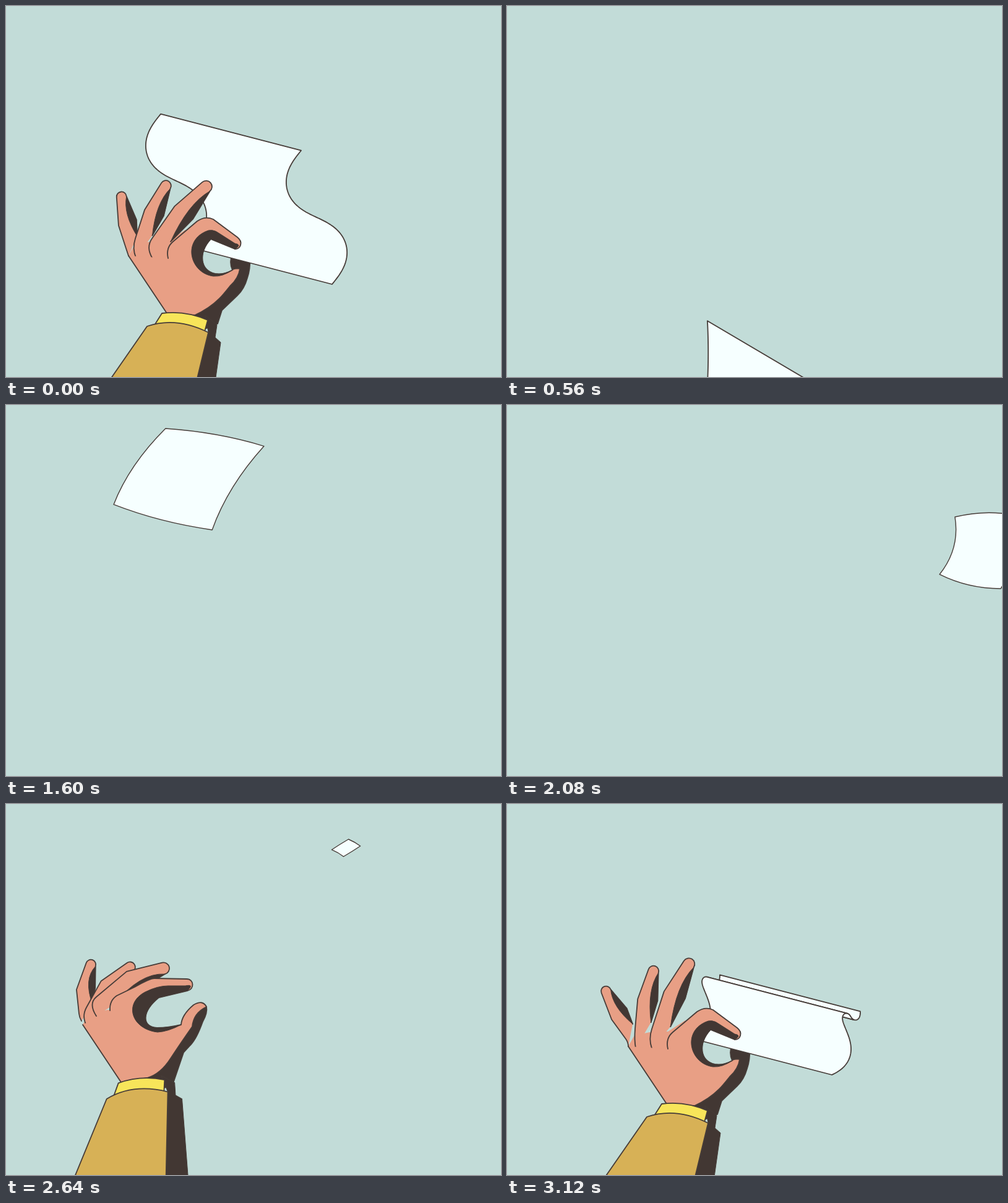
An HTML page with a canvas that plays this animation: 800 px wide and 600 px high, repeating every 3200 ms.

```html
<!DOCTYPE html>
<html lang="en">
<head>
<meta charset="utf-8">
<title>Paper throw</title>
<style>
html, body { margin: 0; width: 100%; height: 100%; overflow: hidden; background: #c2dcd8; }
canvas { display: block; width: 100vw; height: 100vh; }
</style>
</head>
<body>
<canvas id="stage" width="800" height="600"></canvas>
<script>
const LOOP = 3200, STEP = 80;
const INK = '#463c38', DARK = '#423733', SKIN = '#e89f85', PAPER = '#f6ffff';
const BG = '#c2dcd8', YELLOW = '#f7e55a', COAT = '#d7b156';
const ctx = document.getElementById('stage').getContext('2d');
const { sin, cos, abs, hypot, PI } = Math;
const rad = deg => deg * PI / 180;
const lerp = (a, b, k) => a + (b - a) * k;

// Each outline runs from the closed grip to the open hand
const GRIP = {
  hole: ['L331 377 C310 400 314 428 338 433 Q352 435 366 427',
         'L321 360 C294 382 292 407 318 409 Q336 409 357 404'],
  finger: ['M262 408 Q258 391 270 381 L309 348 Q322 339 335 345 L374 374 C384 382 379 393 370 393',
           'M242 381 Q241 365 253 357 L282 343 Q306 329 314 329 L366 330 C378 330 379 347 367 349'],
  thumb: ['Q366 426 370 425 Q374 424 378 425 Q376 440 362 453 Q350 468 345 473 Q328 490 305 500',
          'Q358 388 377 372 Q392 363 398 375 Q377 385 375 407 Q354 437 341 457 Q324 484 302 490'],
  curl: ['Q350 438 335 437 C298 432 285 382 322 365 Q333 359 345 368 L370 384 Q382 386 370 393',
         'Q336 415 319 416 C276 411 264 369 299 351 Q319 341 336 341 L364 341 Q379 338 367 349'],
  shade: ['M366 427 Q360 414 366 402 L394 410 Q395 425 390 440 Q385 458 374 468 L349 492 L342 514 L322 522 L300 500 Z',
          'M374 409 Q374 387 386 372 L398 375 Q400 385 392 399 Q382 427 372 437 L361 449 L344 499 L324 509 L299 490 Z']
};
const PALM = 'M198 404 L208 386 L238 380 L262 380 L290 362 L292 440 L300 498 L260 497 Z';
const ARM = 'M322 500 L341 516 L338 536 L347 544 L297 900 L237 900 L327 528 Z';
const CUFF = 'M252 497 Q290 492 326 508 L320 530 L240 516 Z';
const SLEEVE = 'M228 518 Q275 502 327 528 L237 900 L-37 900 Z';

// Pinky, ring and middle finger
const FINGERS = [
  { root: [[194, 392], [192, 386]], bones: [39, 46], width: 16, hook: [4, 12] },
  { root: [[209, 376], [204, 376]], bones: [49, 51], width: 17, hook: [1, 31] },
  { root: [[236, 376], [220, 359]], bones: [64, 59], width: 19, hook: [0, 31] }
];
const REST = { open: 0, fan: [-18, 18, 35], bend: 14 };
const BENT = { open: 0, fan: [-1, 24, 39], bend: 23 };
const SPREAD = { open: 0, fan: [-36, 5, 18], bend: 15 };
const WIDE = { open: 1, fan: [-6, 29, 50], bend: 26 };

// Side of the held sheet: length, lean, drift, wave and curl of its heading
const FLAT = [170, -5, 0, 45, 0];
const key = (t, x, y, turn, pose, sheet = FLAT) => ({ t, x, y, turn, ...pose, sheet });
const KEYS = [
  key(0, 0, 0, 0, REST, [276, -13, 0, 52, 0]),
  key(240, -11.5, 63.5, 2.2, BENT, [330, -32, -24, 34, 0]),
  key(400, 60, -120, -5, REST, [300, 35, 20, 35, 0]),
  key(560, -16, 386, 16, BENT, [272, -11, -16, 0, 0]),
  key(640, -16, 456, 16, BENT, [272, -11, -16, 0, 0]),
  key(2320, -134, 373, -10, WIDE),
  key(2640, -74, -47, 0, WIDE),
  key(2800, -99, -37, -4, WIDE),
  key(2960, -5, -45, -2, SPREAD),
  key(3040, 5, -30, 0, SPREAD),
  key(3120, -2, -12, 0, SPREAD, [156, 5, -70, 25, 155])
];

function mix(a, b, k) {
  if (typeof a === 'number') return lerp(a, b, k);
  if (Array.isArray(a)) return a.map((v, i) => mix(v, b[i], k));
  return Object.fromEntries(Object.keys(a).map(n => [n, mix(a[n], b[n], k)]));
}

function stateAt(t) {
  let i = KEYS.findIndex(k => k.t > t);
  if (i < 0) i = KEYS.length - 1;
  const a = KEYS[i - 1], b = KEYS[i];
  return mix(a, b, (1 - cos(PI * (t - a.t) / (b.t - a.t))) / 2);
}

const NUM = /-?[\d.]+/g;
function morph([a, b], k) {
  const end = b.match(NUM);
  let i = 0;
  return a.replace(NUM, n => lerp(+n, +end[i++], k).toFixed(2));
}

function shape(d, fill, line = 1.8) {
  const path = new Path2D(d);
  ctx.fillStyle = fill;
  ctx.fill(path);
  if (line) {
    ctx.lineWidth = line;
    ctx.stroke(path);
  }
}

function turned(x, y, deg, draw, dx = 0, dy = 0) {
  ctx.save();
  ctx.translate(x + dx, y + dy);
  ctx.rotate(rad(deg));
  ctx.translate(-x, -y);
  draw();
  ctx.restore();
}

// Two bones with a round tip; the shadow widens at the knuckle
function finger({ root, bones, width: w, hook }, angle, bend, open) {
  const a1 = rad(angle), a2 = rad(angle + bend);
  const move = ([x, y], a, along, across) =>
    [x + along * sin(a) + across * cos(a), y - along * cos(a) + across * sin(a)];
  const s = mix(root[0], root[1], open);
  const knuckle = move(s, a1, bones[0], 0);
  const left = move(knuckle, a2, bones[1], 0), right = move(left, a2, 0, w);
  const end = [s[0] + hook[0], s[1] + hook[1]];
  const side = `L${move(knuckle, a1, 0, 1.9 * w)} L${move(s, a1, 13, 1.45 * w)}`;
  shape(`M${end} Q${move(s, a1, -.55 * hook[1], 0)} ${s} L${knuckle} L${left}
    A${w / 2} ${w / 2} 0 0 1 ${right} ${side}`, SKIN);
  shape(`M${right} ${side} Q${move(knuckle, a1, 16, .8 * w)} ${right}`, DARK, 1);
}

function handFront({ open, fan, bend }) {
  const part = name => morph(GRIP[name], open);
  shape(PALM, SKIN, 0);
  FINGERS.forEach((f, i) => finger(f, fan[i], bend, open));
  shape(part('finger') + part('hole') + part('thumb') + 'L260 497 L198 404', SKIN);
  const tip = part('finger').split(' ').slice(-2).join(' ');
  shape('M' + tip + part('hole') + part('curl') + 'Z', DARK, 1);
  turned(260, 481, -12.4 * open, () => {
    shape(ARM, DARK, 1);
    shape(CUFF, YELLOW);
    shape(SLEEVE, COAT);
  });
}

const poly = pts => 'M' + pts.join('L');

// Walks up the side by its heading, then sweeps it left; folds split the faces
function heldSheet([length, lean, drift, wave, curl]) {
  const N = 100, vx = -227, vy = -59;
  const pts = [[527, 450]], cuts = [0];
  let last = 0;
  for (let i = 0; i < N; i++) {
    const s = (i + .5) / N, [x, y] = pts[i];
    const a = rad(lean + drift * (s - .5) + wave * cos(2 * PI * s) +
      curl * Math.exp(-(((s - .82) / .09) ** 2)));
    const dx = sin(a) * length / N, dy = -cos(a) * length / N;
    const facing = Math.sign(dx * vy - dy * vx);
    if (last && facing !== last) cuts.push(i);
    last = facing;
    pts.push([x + dx, y + dy]);
  }
  for (let i = cuts.length - 1; i >= 0; i--) {
    const run = pts.slice(cuts[i], (cuts[i + 1] ?? N) + 1);
    const far = run.map(([x, y]) => [x + vx, y + vy]).reverse();
    shape(poly(run.concat(far)) + 'Z', PAPER);
  }
  if (cuts.length > 2) shape(poly(pts.slice(cuts[1], cuts[2] + 1)), DARK, 1);
}

function flyingSheet({ x, y, size, ratio, angle, skew, twist = 0, bow = 0, sway = 0 }) {
  const a = rad(angle), b = rad(angle + skew), r = size * ratio;
  const at = (i, j, dy = 0) =>
    [x + i * size * cos(a) + j * r * cos(b), y + i * size * sin(a) + j * r * sin(b) + dy];
  shape(`M${at(-1, -1)} Q${at(0, -1 - bow, twist / 2)} ${at(1, -1, twist)}
    Q${at(1 + sway, 0, twist / 2)} ${at(1, 1)} Q${at(0, 1 + bow)} ${at(-1, 1)}
    Q${at(-1 + sway, 0)} ${at(-1, -1)} Z`, PAPER, 1.4);
}

// One loop across the stage, shrinking and turning once
function glide(p) {
  flyingSheet({
    x: lerp(-170, 761, p) + 420 * sin(2 * PI * p),
    y: lerp(241, 239, p) + 240 * (1 - p) * sin(3 * PI * p),
    size: lerp(110.9, 50.8, p), ratio: lerp(1.022, .947, p),
    angle: lerp(7.2, -346.9, p), skew: lerp(131.3, 91.9, p),
    twist: -25 * p, bow: .25 * p, sway: .42 * p
  });
}

// Small and far at q = 0, then swinging round towards the hand
function comeBack(q) {
  const near = q > 0;
  flyingSheet({
    x: 549.5 + (near ? 180 * sin(PI * q) : 225 * q * q),
    y: 71 + (near ? 220 * q ** 3 - 40 * sin(PI * q) : 30 * q * q),
    size: 16 + (near ? 97 * q ** 3 : -11 * q), ratio: .69,
    angle: -32 + 46 * abs(q), skew: 62 + 42 * abs(q), bow: .05, sway: .1
  });
}

function draw(now) {
  const t = Math.floor(now % LOOP / STEP) * STEP;
  const state = stateAt(t);
  const inHand = fn => turned(300, 450, state.turn, fn, state.x, state.y);
  ctx.fillStyle = BG;
  ctx.fillRect(0, 0, 800, 600);
  ctx.strokeStyle = INK;
  ctx.lineJoin = ctx.lineCap = 'round';

  inHand(() => shape(morph(GRIP.shade, state.open), DARK));
  if (t < 720 || t >= 3040) inHand(() => heldSheet(state.sheet));
  else if (t >= 2240) comeBack((t - 2640) / 320);
  else if (t >= 1120) glide((t - 1120) / 960);
  inHand(() => handFront(state));
}

const start = performance.now();
function tick() {
  draw(performance.now() - start);
  requestAnimationFrame(tick);
}
tick();
</script>
</body>
</html>
```
